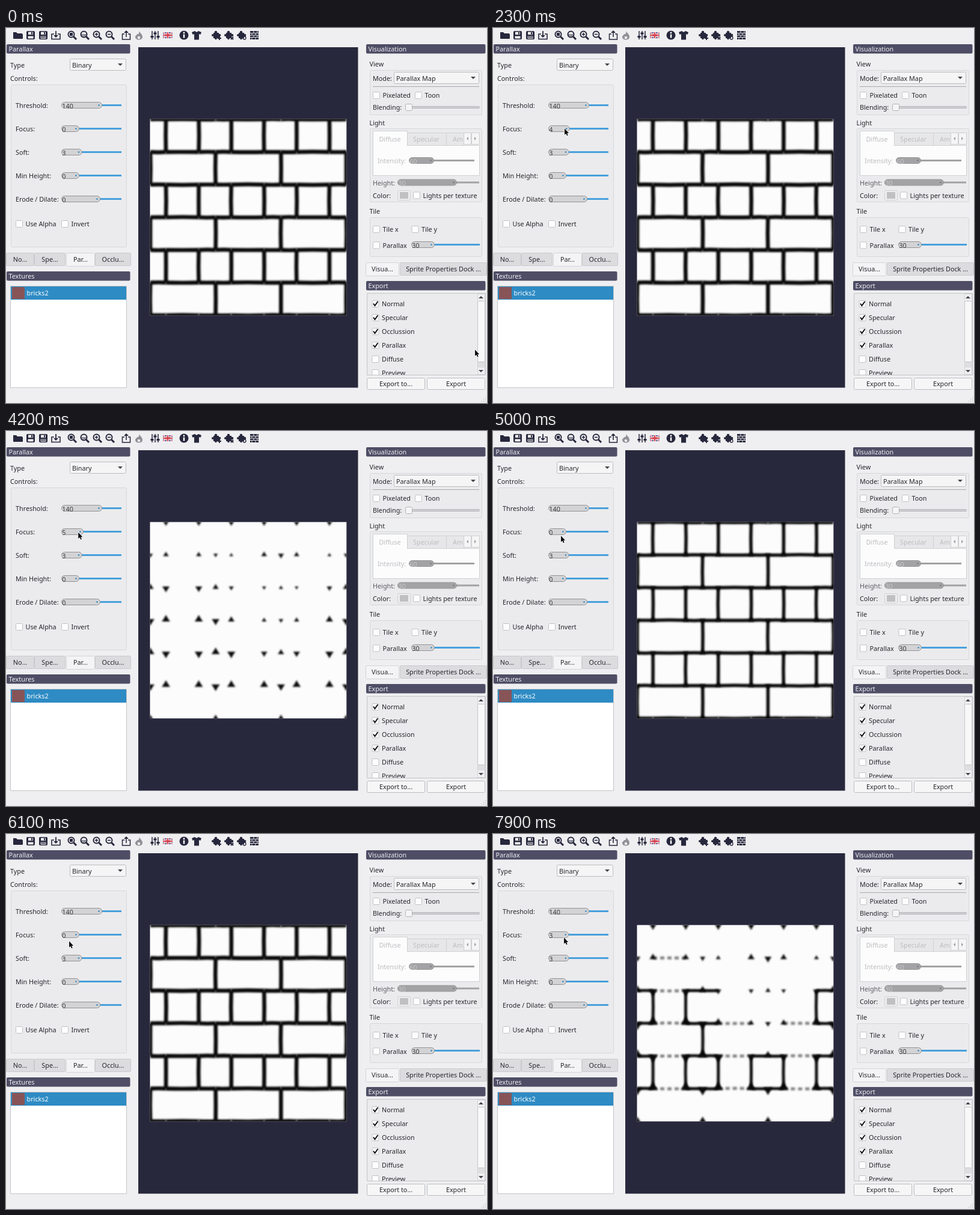
An HTML page with a canvas for the animation above (8000 ms loop, 800x624 px).

```html
<!DOCTYPE html>
<html lang="en">
<head>
<meta charset="utf-8">
<title>Parallax focus</title>
<style>
  html, body { margin: 0; width: 100%; height: 100%; overflow: hidden; background: #efeff1; }
  canvas { display: block; }
</style>
</head>
<body>
<canvas id="stage" width="800" height="624"></canvas>
<script>
const ctx = document.getElementById('stage').getContext('2d');
const LOOP = 8000, TICK = 100, PRESS = 1600, FIRST_RENDER = 2500;
const BG = '#efeff1', INK = '#26262c', NAVY = '#27273d', BAR = '#4e4d65', BLUE = '#48a0dc';
const EDGE = '#bcbdc0', SOFT = '#d6d7da', DIM = '#bdbdc1', PANEL = '#ebebed';

// pointer path: [time, x, y]
const PATH = [[100, 780, 536], [1500, 113, 170], [1700, 113, 170], [2200, 119, 168], [2800, 119, 168],
  [3050, 122, 168], [4000, 122, 168], [5000, 113, 175], [6100, 105, 179], [6200, 105, 179],
  [6800, 123, 171], [7400, 123, 171], [7900, 118, 173]];

function pointAt(t) {
  const n = PATH.findIndex(k => k[0] > t);
  if (n === 0) return PATH[0].slice(1);
  if (n < 0) return PATH[PATH.length - 1].slice(1);
  const [t0, x0, y0] = PATH[n - 1], [t1, x1, y1] = PATH[n];
  const p = (t - t0) / (t1 - t0);
  return [x0 + (x1 - x0) * p, y0 + (y1 - y0) * p];
}

// The slider follows the pointer; the picture follows the slider one tick later.
const focusAt = t => t < PRESS ? 0 : Math.max(0, Math.round((pointAt(t)[0] - 113) * 0.68));
const levelAt = t => t < FIRST_RENDER ? 0 : focusAt(t - TICK);

function box(x0, y0, x1, y1, fill, stroke, r = 0) {
  const o = stroke ? 0.5 : 0;
  ctx.beginPath();
  ctx.roundRect(x0 + o, y0 + o, x1 - x0 - 2 * o, y1 - y0 - 2 * o, r);
  if (fill) { ctx.fillStyle = fill; ctx.fill(); }
  if (stroke) { ctx.strokeStyle = stroke; ctx.lineWidth = 1; ctx.stroke(); }
}

function line(color, width, ...p) {
  ctx.strokeStyle = color;
  ctx.lineWidth = width;
  ctx.beginPath();
  for (let i = 0; i < p.length; i += 2) ctx.lineTo(p[i], p[i + 1]);
  ctx.stroke();
}

function poly(color, ...p) {
  ctx.fillStyle = color;
  ctx.beginPath();
  for (let i = 0; i < p.length; i += 2) ctx.lineTo(p[i], p[i + 1]);
  ctx.closePath();
  ctx.fill();
}

// filled triangle pointing along angle (0 = right)
function arrow(x, y, angle, color = '#44444a', r = 4) {
  ctx.save();
  ctx.translate(x, y);
  ctx.rotate(angle);
  poly(color, -r / 2, -r, -r / 2, r, r / 2, 0);
  ctx.restore();
}

function disc(x, y, r, color) {
  ctx.fillStyle = color;
  ctx.beginPath();
  ctx.arc(x, y, r, 0, 7);
  ctx.fill();
}

function ring(x, y, r, color, width) {
  ctx.strokeStyle = color;
  ctx.lineWidth = width;
  ctx.beginPath();
  ctx.arc(x, y, r, 0, 7);
  ctx.stroke();
}

function text(s, x, y, color = INK, align = 'left', font = '10.8px "Noto Sans"') {
  ctx.font = font + ', sans-serif';
  ctx.textAlign = align;
  ctx.fillStyle = color;
  ctx.fillText(s, x, y + 4);
}

function title(s, x0, y, x1) {
  box(x0, y, x1 - 0.5, y + 15.5, BAR, null, 2);
  text(s, x0 + 3.5, y + 8, '#f0f0f4');
}

function check(s, x, y, on) {
  box(x - 6, y - 6, x + 6, y + 6, '#fdfdfd', '#c2c3c6', 1);
  if (on) line('#111', 2, x - 3.5, y - 0.5, x - 1, y + 3, x + 4, y - 4);
  text(s, x + 10.5, y);
}

function slider(y, x0, x1, end, value, off) {
  line(off ? '#a2a2a4' : BLUE, 3, x1 - 1, y - 0.5, end, y - 0.5);
  box(x0, y - 6, x1, y + 5, off ? '#a3a3a5' : '#d3d3d5', off ? '#98989a' : '#939396', 5);
  text(value, x0 + 1.3, y + 0.5, off ? '#c6c6c8' : '#3c3c40');
  disc(x1 - 5.5, y - 0.5, 1.3, off ? '#77777a' : '#2f86c2');
}

function combo(s, x0, y0, x1) {
  box(x0, y0, x1, y0 + 20, '#f5f5f6', EDGE, 2);
  text(s, x0 + 4, y0 + 10.5);
  arrow(x1 - 10, y0 + 10, Math.PI / 2);
}

function tab(s, x0, x1, y, active) {
  box(x0, y, x1, y + (active ? 23 : 22), active ? '#f4f4f6' : '#dcdcdf', active ? '#d4d5d8' : '#c9cacd', 1);
  text(s, (x0 + x1) / 2, y + 11, INK, 'center');
}

function button(s, x0, x1) {
  box(x0, 582, x1, 602, '#f6f6f7', EDGE, 2);
  text(s, (x0 + x1) / 2, 592, INK, 'center');
}

// running-bond brick lines over a small square
function bond(x0, y0, size, rows, color, width) {
  const h = size / rows;
  for (let r = 0; r < rows; r++) {
    const y = y0 + r * h;
    if (r) line(color, width, x0, y, x0 + size, y);
    for (let x = x0 + h * (r % 2 ? 0.85 : 1.7); x < x0 + size; x += h * 1.7) line(color, width, x, y, x, y + h);
  }
}

// toolbar icons, drawn around the origin
const icons = {
  folder() {
    poly(NAVY, -8, -5, -3, -5, -1, -3, 7, -3, 7, -1, -8, -1);
    box(-8, -2, 8, 6, NAVY, null, 1);
  },
  save() {
    box(-7, -7, 7, 7, NAVY, null, 2);
    box(-4, -5.5, 4, -1, '#eee');
    box(-4.5, 1.5, 4.5, 5.5, '#eee');
    box(1, -5, 3, -1.5, NAVY);
  },
  saveAs() { icons.save(); box(-4, 2.5, 4, 4, NAVY); },
  load() {
    line(NAVY, 1.6, -3, -2, -7, -2, -7, 6.5, 7, 6.5, 7, -2, 3, -2);
    line(NAVY, 1.8, 0, -7, 0, 2);
    arrow(0, 2, Math.PI / 2, NAVY);
  },
  zoom(kind) {
    line(NAVY, 3, 2.5, 2.5, 7, 7);
    ring(-1.5, -1.5, 5, NAVY, 2);
    if (kind === 'fit') box(-4, -4, 1, 1, NAVY);
    else if (kind === 'full') text('100', -1.5, -2, NAVY, 'center', 'bold 5px "Noto Sans"');
    else line(NAVY, 1.6, -4, -1.5, 1, -1.5);
    if (kind === 'in') line(NAVY, 1.6, -1.5, -4, -1.5, 1);
  },
  share() {
    line(NAVY, 1.5, -3, -2, -6.5, -2, -6.5, 7, 6.5, 7, 6.5, -2, 3, -2);
    line(NAVY, 1.6, 0, 3, 0, -5);
    arrow(0, -6, -Math.PI / 2, NAVY);
  },
  flame() {
    ctx.fillStyle = '#909096';
    ctx.beginPath();
    ctx.moveTo(0, -7);
    ctx.bezierCurveTo(3, -3, 6, -1, 6, 3);
    ctx.bezierCurveTo(6, 9, -6, 9, -6, 3);
    ctx.bezierCurveTo(-6, 0, -3, 0, -3, -2);
    ctx.bezierCurveTo(0, -1, 1, -4, 0, -7);
    ctx.fill();
    disc(0, 4, 2.3, BG);
  },
  sliders() {
    for (const x of [-5, 0, 5]) {
      line(NAVY, 1.5, x, -7, x, 7);
      const y = x ? 2.5 : -3;
      box(x - 2.5, y - 1.5, x + 2.5, y + 1.5, NAVY);
    }
  },
  flag() {
    box(-8, -5, 8, 5, '#35478a');
    const cross = (color, diagonal, upright) => {
      line(color, diagonal, -8, -5, 8, 5);
      line(color, diagonal, -8, 5, 8, -5);
      line(color, upright, -8, 0, 8, 0);
      line(color, upright, 0, -5, 0, 5);
    };
    cross('#fff', 2.4, 4);
    cross('#d2404e', 0.9, 2.2);
  },
  info() {
    disc(0, 0, 7.5, NAVY);
    box(-1.2, -1.5, 1.2, 4.5, '#fff');
    disc(0, -4, 1.4, '#fff');
  },
  shirt() {
    poly(NAVY, -3, -7, 0, -5, 3, -7, 8, -5, 6.5, -1, 4, -2, 4, 7.5, -4, 7.5, -4, -2, -6.5, -1, -8, -5);
  },
  puzzle(kind) {
    box(-5, -4, 4, 5, NAVY);
    disc(-1, -5, 2.3, NAVY);
    disc(5, 0, 2.3, NAVY);
    disc(-6, 0, 2, NAVY);
    disc(-1, 5.5, 1.8, NAVY);
    if (kind === 'turn') return ring(4.5, 4.5, 2.5, NAVY, 1.3);
    ctx.translate(5, 5);
    if (kind === 'cut') ctx.rotate(Math.PI / 4);
    line(NAVY, 2, -3, 0, 3, 0);
    line(NAVY, 2, 0, -3, 0, 3);
  },
  bricks() {
    box(-7, -7, 7, 7, NAVY);
    bond(-7, -7, 14, 4, BG, 0.9);
  }
};

// icon groups by the x of their first icon
const TOOLS = {
  20: ['folder', 'save', 'saveAs', 'load'],
  110: ['zoom fit', 'zoom full', 'zoom in', 'zoom out'],
  200: ['share', 'flame'],
  248: ['sliders', 'flag'],
  296: ['info', 'shirt'],
  350: ['puzzle add', 'puzzle cut', 'puzzle turn', 'bricks']
};

function toolbar() {
  for (const x in TOOLS) TOOLS[x].forEach((tool, i) => {
    const [name, kind] = tool.split(' ');
    ctx.save();
    ctx.translate(+x + 21 * i, 12);
    icons[name](kind);
    ctx.restore();
  });
}

function leftSide(focus) {
  title('Parallax', 1, 27, 207);
  text('Type', 7, 62);
  combo('Binary', 106, 51, 200);
  text('Controls:', 7, 84);
  box(8, 94, 201, 365, PANEL, SOFT, 2);
  const controls = [['Threshold:', 160, 140], ['Focus:', 122 + focus * 1.4, focus], ['Soft:', 126.5, 3],
    ['Min Height:', 122, 0], ['Erode / Dilate:', 157, 0]];
  controls.forEach(([label, end, value], i) => {
    const y = 129 + 39 * i;
    text(label, 16, y);
    slider(y, 92, end, 192, value);
  });
  check('Use Alpha', 22, 326);
  check('Invert', 98, 326);
  tab('No...', 0, 47, 374);
  tab('Spe...', 47, 99, 374);
  tab('Occlu...', 148, 208, 374);
  tab('Par...', 100, 148, 374, true);

  title('Textures', 1, 405, 207);
  box(7, 429, 201, 599, '#fff', '#c4c5c8');
  box(8, 430, 200, 452, '#2e8bc4');
  box(10, 431, 31, 451, '#915455');
  bond(10.5, 431, 20, 6, '#73585e', 0.7);
  text('bricks2', 34.5, 441, '#fff');
}

function viewPanel() {
  title('Visualization', 599, 27, 798);
  text('View', 604.5, 60);
  box(605, 70, 792, 145, PANEL, SOFT, 2);
  text('Mode:', 610, 84);
  combo('Parallax Map', 645, 73, 787);
  line('#a9a9ad', 1, 610, 97.5, 787, 97.5);
  check('Pixelated', 616, 112);
  check('Toon', 686, 112);
  text('Blending:', 610, 132);
  box(670, 130, 788, 134, '#d0d0d3', '#b5b6b9', 1);
  box(664, 126, 676, 138, '#f5f5f6', '#b2b3b6', 2);
}

function lightPanel() {
  const rim = '#cfd0d3', page = '#fcfcfd', grey = '#a0a0a4';
  text('Light', 604.5, 158);
  box(605, 167, 792, 290, PANEL, SOFT, 2);
  box(667, 174, 733, 196, '#e7e7e9', rim);
  box(732, 174, 762, 196, '#e7e7e9', rim);
  box(610, 195, 788, 246, page, rim);
  box(610, 171, 668, 196, page, rim);
  box(611, 194, 667, 198, page);
  text('Diffuse', 638.5, 185, DIM, 'center');
  text('Specular', 699, 185, DIM, 'center');
  text('Am', 743, 185, DIM);
  box(761, 174, 774, 194, '#f5f5f6', rim);
  box(774, 174, 788, 194, '#f5f5f6', rim);
  arrow(767.5, 184, Math.PI, grey, 3);
  arrow(780.5, 184, 0, grey, 3);
  text('Intensity:', 618, 221, DIM);
  slider(221, 670, 712, 779, 60, true);
  text('Height:', 610, 258, '#5c5c62');
  slider(257.5, 651, 750, 787, 30, true);
  text('Color:', 610, 278.5);
  box(651, 270, 673, 287, '#eeeeef', rim, 2);
  box(655, 273, 669, 284, '#c0c0c3');
  check('Lights per texture', 683, 278.5);
}

function tilePanel() {
  text('Tile', 604.5, 305);
  box(605, 315, 792, 381, PANEL, SOFT, 2);
  check('Tile x', 616, 335);
  check('Tile y', 680.5, 335);
  check('Parallax', 616, 361.5);
  slider(361, 674, 713, 788, 30);
  tab('Sprite Properties Dock ...', 655, 800, 390);
  tab('Visua...', 598, 654, 390, true);
}

function exportPanel() {
  title('Export', 599, 421, 798);
  box(600, 441, 798, 578, PANEL, '#c4c5c8');
  ctx.save();
  ctx.beginPath();
  ctx.rect(601, 442, 183, 135);
  ctx.clip();
  ['Normal', 'Specular', 'Occlussion', 'Parallax', 'Diffuse', 'Preview']
    .forEach((s, i) => check(s, 614.5, 459 + 23 * i, i < 4));
  ctx.restore();
  box(784, 442, 797, 577, '#f0f0f2', '#d3d4d7');
  box(785, 455, 796, 565, '#dedee0');
  box(784, 454, 797, 556, '#f8f8f9', '#c4c5c8', 1);
  arrow(790, 448, -Math.PI / 2);
  arrow(790, 571, Math.PI / 2);
  button('Export to...', 600, 697);
  button('Export', 700, 797);
  for (let i = 0; i < 3; i++) for (let j = 0; j <= i; j++) disc(797.5 - 3 * j, 615 + 3 * i, 0.7, '#bbbbc0');
}

// Mortar grid: every third column joins two wide bricks, the others narrow ones.
const SIDE = 326, COURSES = 6;
const colX = c => 240 + SIDE / 3 * Math.floor(c / 3) + [0, 26, 80.6][c % 3];
const rowY = i => 152 + SIDE / COURSES * i;
const isWide = c => c % 3 === 0;

// Mortar depth: grows downwards, shallow right of the middle and at the top and bottom border.
function depth(x, i) {
  if (i % COURSES === 0) return -1;
  return 0.72 * (i - 1) + Math.cos(2 * Math.PI * ((x - 240) / SIDE - 0.14));
}
const holds = d => d > 0.815;

function seam(level, hold, x0, y0, x1, y1) {
  const wobble = Math.sin(x0 * 2 + y0), dx = y1 > y0 ? wobble : 0, dy = dx ? 0 : wobble;
  ctx.lineWidth = level ? 5.7 - 0.2 * level : 6.6;
  ctx.globalAlpha = level ? 1 - (2 - hold) * (level - 1) / 6 : 1;
  ctx.setLineDash(hold === 1 && level > 2 ? [7, 5] : []);
  ctx.beginPath();
  ctx.moveTo(x0, y0);
  ctx.quadraticCurveTo((x0 + x1) / 2 + dx, (y0 + y1) / 2 + dy, x1, y1);
  ctx.stroke();
}

function seams(level) {
  for (let i = 0; i <= COURSES; i++) for (let c = 0; c <= 9; c++) {
    const x = colX(c), y = rowY(i);
    if (c < 9) {
      const next = colX(c + 1), long = next - x > 40;
      seam(level, holds(depth((x + next) / 2, i)) ? (long ? 1 : 2) : 0, x, y, next, y);
    }
    if (i < COURSES && isWide(c) === (i % 2 === 1)) {
      const inside = c % 9 > 0;
      seam(level, inside && holds(depth(x, i)) && holds(depth(x, i + 1)) ? 2 : 0, x, y, x, rowY(i + 1));
    }
  }
  ctx.globalAlpha = 1;
  ctx.setLineDash([]);
}

// triangular remains where three seams meet
function joints(level) {
  ctx.beginPath();
  for (let i = 0; i <= COURSES; i++) for (let c = 0; c <= 9; c++) {
    if (i === (isWide(c) ? 0 : COURSES)) continue;
    const x = colX(c), dir = isWide(c) === (i % 2 === 1) ? 1 : -1;
    const size = Math.min(6, 2.7 + 1.6 * Math.abs(depth(x, i)));
    const s = level < 3 ? 5 : size * (level < 5 ? 1.4 : 1.15);
    const base = rowY(i) - dir * 2, mid = base + dir * s * 0.8;
    ctx.moveTo(x - s, base);
    ctx.quadraticCurveTo(x - s * 0.4, mid, x, base + dir * s * 1.6);
    ctx.quadraticCurveTo(x + s * 0.4, mid, x + s, base);
    ctx.closePath();
  }
  ctx.fill();
}

function texture(level) {
  box(220, 32, 585.5, 598.5, '#28283d');
  ctx.save();
  ctx.beginPath();
  ctx.rect(239.5, 151.5, SIDE + 0.8, SIDE + 0.8);
  ctx.clip();
  ctx.fillStyle = '#fdfcfd';
  ctx.fillRect(239, 151, SIDE + 2, SIDE + 2);

  // blur the whole mortar layer in one pass
  ctx.filter = `blur(${level ? 1.8 : 1.6}px)`;
  ctx.beginLayer ? ctx.beginLayer() : 0;
  ctx.strokeStyle = ctx.fillStyle = '#080808';
  if (level < 5) seams(level);
  if (level) joints(level);
  ctx.endLayer ? ctx.endLayer() : 0;
  ctx.restore();
}

function pointer(x, y) {
  ctx.save();
  ctx.translate(x, y - 0.7);
  ctx.beginPath();
  [[0, 0], [0, 10.5], [2.4, 8.4], [4, 12], [5.7, 11.2], [4.2, 7.8], [7.2, 7.6]].forEach(p => ctx.lineTo(...p));
  ctx.closePath();
  ctx.lineWidth = 1.2;
  ctx.strokeStyle = '#fff';
  ctx.stroke();
  ctx.fillStyle = '#0c0c0c';
  ctx.fill();
  ctx.restore();
}

function draw(t) {
  ctx.fillStyle = BG;
  ctx.fillRect(0, 0, 800, 624);
  toolbar();
  leftSide(focusAt(t));
  viewPanel();
  lightPanel();
  tilePanel();
  exportPanel();
  texture(levelAt(t));
  pointer(...pointAt(t));
}

const start = performance.now();
let last = -1;
function loop() {
  const tick = Math.floor(((performance.now() - start) % LOOP) / TICK);
  if (tick !== last) draw(tick * TICK);
  last = tick;
  requestAnimationFrame(loop);
}
loop();
</script>
</body>
</html>
```
